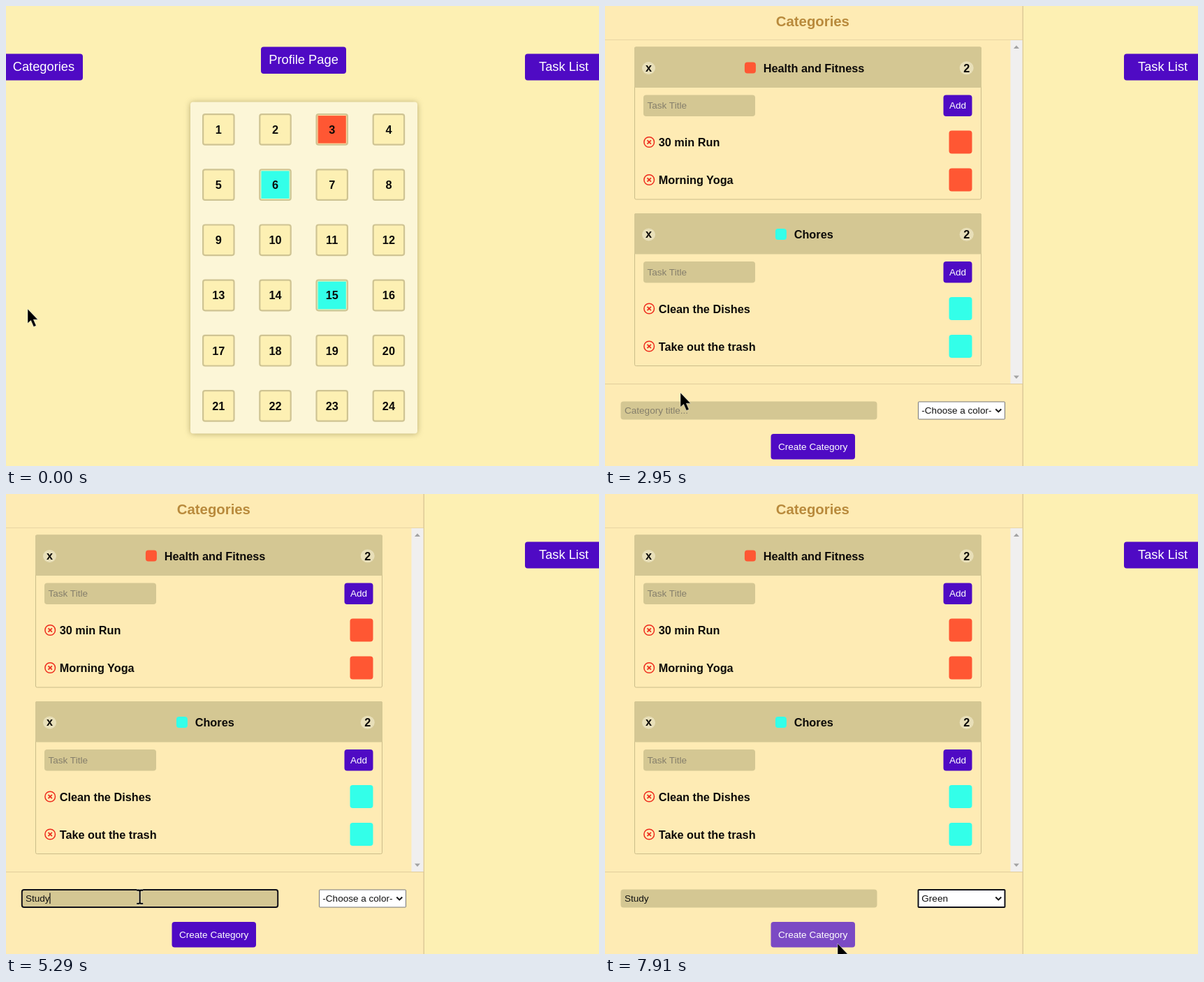
These frames come from a looping animation (849x659 px, 8000 ms). An HTML page:

```html
<!DOCTYPE html>
<html lang="en">
<head>
<meta charset="utf-8">
<title>Task planner</title>
<style>
html, body { margin: 0; width: 100%; height: 100%; overflow: hidden; background: #fdf0b3; }
svg { display: block; width: 849px; height: 659px; }
text { font-family: "Liberation Sans", Arial, sans-serif; font-size: 13.56px; fill: #111; }
.b { font-size: 16.27px; font-weight: bold; fill: #0c0a08; }
.nav { font-size: 18.3px; }
.w { fill: #fff; }
.ph { fill: #857f6b; }
.mid { text-anchor: middle; }
.title { font-size: 20.34px; font-weight: bold; fill: #b98a3c; }
.auto { font-family: "Open Sans", sans-serif; font-size: 12.7px; font-weight: 600; fill: #dfe0e2; }
</style>
</head>
<body>
<svg id="stage" viewBox="0 0 849 659" xmlns="http://www.w3.org/2000/svg"></svg>
<script>
const LOOP = 8000;
const PURPLE = '#4f0ac4', HOVER = '#7b4ac4', TAN = '#d4c793', RED = '#ff5733', CYAN = '#33ffe9';
const COLORS = ['-Choose a color-', 'Red', 'Orange', 'Yellow', 'Pink', 'Purple', 'Blue', 'Cyan', 'Green', 'Lime',
  'Teal', 'Navy', 'Brown', 'Maroon', 'Olive', 'Gold', 'Silver', 'Gray', 'Black', 'White'];
const POP = { x: 448, y: 207, w: 125, row: 18 };

const rect = (x, y, w, h, fill, r = 0, more = '') =>
  `<rect x="${x}" y="${y}" width="${w}" height="${h}" rx="${r}" fill="${fill}" ${more}/>`;
const text = (x, y, s, cls = '', more = '') => `<text x="${x}" y="${y}" class="${cls}" ${more}>${s}</text>`;
const line = (x1, y1, x2, y2, c) => `<path d="M${x1} ${y1}L${x2} ${y2}" stroke="${c}"/>`;

function calendar() {
  let out = rect(264, 138, 325, 475, '#8a7f4a', 4, 'filter="url(#soft)" opacity=".6"') +
    rect(264, 137.5, 325, 475, '#fcf6d7', 4);
  for (let i = 0; i < 24; i++) {
    const x = 304.3 + i % 4 * 81.2, y = 176.8 + Math.floor(i / 4) * 79.2;
    const fill = i === 2 ? RED : i === 5 || i === 14 ? CYAN : '#fdf0b3';
    out += rect(x - 22.2, y - 21.7, 44.4, 43.6, fill, 3, 'stroke="#cfc493" stroke-width="2.2"');
    if (fill !== '#fdf0b3') out += rect(x - 20.6, y - 20.2, 41.2, 40.6, 'none', 1, 'stroke="#fdf0b3" stroke-width="1"');
    out += text(x, y + 5.9, i + 1, 'b mid');
  }
  return out;
}

function card(y, name, nameX, color, tasks) {
  let out = rect(42.5, .5, 496, 218, 'none', 2, 'stroke="#cbbd8a"') + rect(42, 0, 497, 58.5, TAN, 2) +
    '<ellipse cx="62.5" cy="30.5" rx="9.5" ry="9" fill="#e8dfb9"/>' + text(62.5, 35.3, 'x', 'b mid') +
    rect(nameX - 26.8, 22, 16, 16, color, 4) + text(nameX, 36, name, 'b') +
    '<ellipse cx="517.7" cy="30.3" rx="10" ry="9.5" fill="#e8dfb9"/>' + text(517.7, 36, 2, 'b mid') +
    rect(55, 69, 160, 30.5, TAN, 4) + text(60.5, 88.8, 'Task Title', 'ph') +
    rect(484.5, 69, 41, 30.5, PURPLE, 4) + text(505, 88.8, 'Add', 'w mid');
  tasks.forEach((task, i) => {
    const cy = 136.5 + i * 54;
    out += `<g transform="translate(63.2 ${cy})" fill="none" stroke="#ee2a1c" stroke-width="1.5">
      <circle r="7.3"/><path d="M-2.7-2.7L2.7 2.7M2.7-2.7L-2.7 2.7" stroke-width="1.7"/></g>` +
      text(76.7, cy + 6, task, 'b') + rect(492.5, cy - 16.5, 33, 33, color, 4);
  });
  return `<g transform="translate(0 ${y})">${out}</g>`;
}

function drawer() {
  return rect(-20, 0, 618, 659, '#feebb4') + line(598.2, 0, 598.2, 659, '#cdb98c') +
    line(0, 48.5, 598, 48.5, '#e8d5a4') + line(0, 541.5, 598, 541.5, '#e0cd9b') +
    text(297.4, 29, 'Categories', 'title mid') +
    rect(580.5, 49, 17, 492, '#f0efef') +
    '<path d="M585 61h8l-4-4.500zM585 529.500h8l-4 4.500z" fill="#a3a3a3"/>' +
    card(58.5, 'Health and Fitness', 226.7, RED, ['30 min Run', 'Morning Yoga']) +
    card(297, 'Chores', 270.7, CYAN, ['Clean the Dishes', 'Take out the trash']) +
    rect(22.5, 566.5, 367, 26, TAN, 4) +
    rect(22.8, 567, 366.4, 25, 'none', 3, 'id="focus" stroke="#101018" stroke-width="2"') +
    text(28, 583.7, '', '', 'id="entry"') + '<path id="caret" stroke="#111" stroke-width="1.2"/>' +
    rect(448.5, 567, 124, 25, '#fff', 1, 'id="select"') + text(453.3, 583.7, '', '', 'id="choice"') +
    '<path d="M559.300 577.500l4 4 4-4" fill="none" stroke="#111" stroke-width="1.900"/>' +
    rect(237.5, 613, 120.5, 36.5, PURPLE, 4, 'id="create"') + text(297.7, 635.7, 'Create Category', 'w mid') +
    `<g id="suggest">${rect(22, 594, 367, 90, '#292a2d', 4, 'id="box"')}
      ${text(34, 625, '', 'auto', 'id="s0"')}${text(34, 661.5, 'Study', 'auto', 'id="s1"')}</g>`;
}

function popup() {
  const { x, y, w, row } = POP, h = row * COLORS.length;
  return rect(x, y, w, h, 'none', 0, 'id="shade" stroke="#3a3010" stroke-width="2.5" filter="url(#thin)"') +
    `<g id="list">${rect(x + .5, y + .5, w - 1, h - 1, '#fff', 0, 'stroke="#767676"')}
      ${rect(x + 1, y, w - 2, row, '#1967d2', 0, 'id="mark"')}
      ${COLORS.map((c, i) => text(x + 5, y + i * row + 13.7, c, 'opt')).join('')}</g>`;
}

const ARROW = '<path d="M0 0V20.500L4.600 16.400L8.600 25.500L12.200 24L8.300 15.200H14.500Z" fill="#000" stroke="#fff" stroke-opacity=".6" stroke-width=".7"/>';
const HAND = '<path d="M-2.500 2C-2.500-.8 1.700-.8 1.800 2V8C4 7 5.500 7.800 6 9C8 8.200 9.300 9 9.700 10.300C11.500 9.800 12.500 11 12.300 13L11.500 19L9.500 23V26H-2V23.500L-8 16.500C-9.300 14-7 12.500-5.200 14L-2.500 16.500Z" fill="#000" stroke="#fff" stroke-opacity=".5" stroke-width=".7"/>';
const BEAM_D = 'd="M-4.500-9.500H-1.200L0-8.500L1.200-9.500H4.500M0-8.500V8.500M-4.500 9.500H-1.200L0 8.500L1.200 9.500H4.500" fill="none"';
const BEAM = `<path ${BEAM_D} stroke="#fff" stroke-opacity=".6" stroke-width="3.500"/><path ${BEAM_D} stroke="#000" stroke-width="2"/>`;

document.getElementById('stage').innerHTML =
  `<defs><filter id="soft" x="-10%" y="-10%" width="120%" height="120%"><feGaussianBlur stdDeviation="4"/></filter>
   <filter id="thin" x="-20%" y="-10%" width="140%" height="120%"><feGaussianBlur stdDeviation="2"/></filter></defs>` +
  rect(0, 0, 849, 659, '#fdf0b3') + calendar() +
  rect(365, 58.5, 122, 38.5, PURPLE, 4) + text(426, 83, 'Profile Page', 'nav w mid') +
  rect(-10, 68.5, 120, 38, PURPLE, 4, 'id="cats"') + text(9.7, 93.3, 'Categories', 'nav w') +
  rect(743, 68.5, 120, 38, PURPLE, 4) + text(763, 93.3, 'Task List', 'nav w') +
  `<g id="drawer">${drawer()}</g>${popup()}
   <g id="cursor"><g>${ARROW}</g><g>${HAND}</g><g>${BEAM}</g></g>`;

const el = id => document.getElementById(id);
const set = (id, props) => { for (const k in props) el(id).setAttribute(k, props[k]); };
const show = (id, on) => { el(id).style.display = on ? '' : 'none'; };
const shapes = [...el('cursor').children], options = [...document.querySelectorAll('.opt')];

// Pointer moves: first change, last change, step count, end point
const MOVES = [
  [100, 100, 1, 84, 432], [430, 510, 2, 87, 418], [830, 930, 2, 117, 275], [1170, 1750, 7, 62, 97],
  [2260, 2450, 3, 199, 377], [2950, 2950, 1, 108, 554], [3040, 3610, 7, 67, 583],
  [5290, 5480, 3, 441, 566], [5680, 5870, 3, 469, 575], [6640, 6830, 3, 508, 363],
  [7220, 7330, 2, 508, 367], [7730, 7910, 3, 333, 644]
];
const KEYS = [4310, 4500, 4590, 4790, 4890];

function steps(t, t0, t1, n) {
  if (t < t0) return 0;
  return n === 1 ? 1 : Math.min(1, (Math.floor((t - t0) / (t1 - t0) * (n - 1) + .001) + 1) / n);
}

function pointer(t) {
  let x = 31, y = 434;
  for (const [t0, t1, n, ex, ey] of MOVES) {
    const p = steps(t, t0, t1, n);
    x += (ex - x) * p;
    y += (ey - y) * p;
  }
  return { x, y };
}

function render(t) {
  const { x, y } = pointer(t);
  const slide = 1 - Math.pow(1 - steps(t, 2070, 2340, 4), 3.42);
  const opened = t >= 2260, listed = t >= 6150 && t < 7530, chosen = t >= 7530;

  const overCats = !opened && x < 110 && y > 68 && y < 107;
  const overEntry = opened && x > 22 && x < 390 && y > 566 && y < 593;
  const overCreate = opened && x > 237 && x < 358 && y > 613 && y < 650;
  set('cats', { fill: overCats ? HOVER : PURPLE });
  set('create', { fill: overCreate ? HOVER : PURPLE });
  set('drawer', { transform: `translate(${-599 * (1 - slide)} 0)` });
  show('drawer', slide > 0);

  const typed = 'Study'.slice(0, KEYS.filter(k => t >= k).length);
  const focused = t >= 3920 && t < 5960;
  const entry = el('entry');
  entry.textContent = typed || 'Category title...';
  entry.setAttribute('class', typed ? '' : 'ph');
  const cx = 28.3 + (typed ? entry.getComputedTextLength() : 0);
  set('caret', { d: `M${cx} 571.500V587` });
  show('caret', focused);
  show('focus', focused);

  show('suggest', typed && typed.length < 5);
  const both = typed.length === 1;
  el('s0').textContent = both ? 'School' : 'Study';
  show('s1', both);
  set('box', { height: both ? 90 : 53 });

  el('choice').textContent = chosen ? 'Green' : COLORS[0];
  set('select', { stroke: chosen ? '#101018' : '#767676', 'stroke-width': chosen ? 2 : 1 });

  show('shade', t >= 5960 && t < 7530);
  set('shade', { opacity: t < 6050 ? .25 : .5 });
  show('list', listed);
  const over = y < POP.y + POP.row * COLORS.length ? Math.floor((y - POP.y) / POP.row) : 0;
  set('mark', { y: POP.y + over * POP.row });
  options.forEach((o, i) => { o.style.fill = i === over ? '#fff' : '#111'; });

  set('cursor', { transform: `translate(${x} ${y})` });
  const shape = overCats ? 1 : overEntry ? 2 : 0;
  shapes.forEach((s, i) => { s.style.display = i === shape ? '' : 'none'; });
}

const start = performance.now();
function tick() {
  render((performance.now() - start) % LOOP);
  requestAnimationFrame(tick);
}
tick();
</script>
</body>
</html>
```
